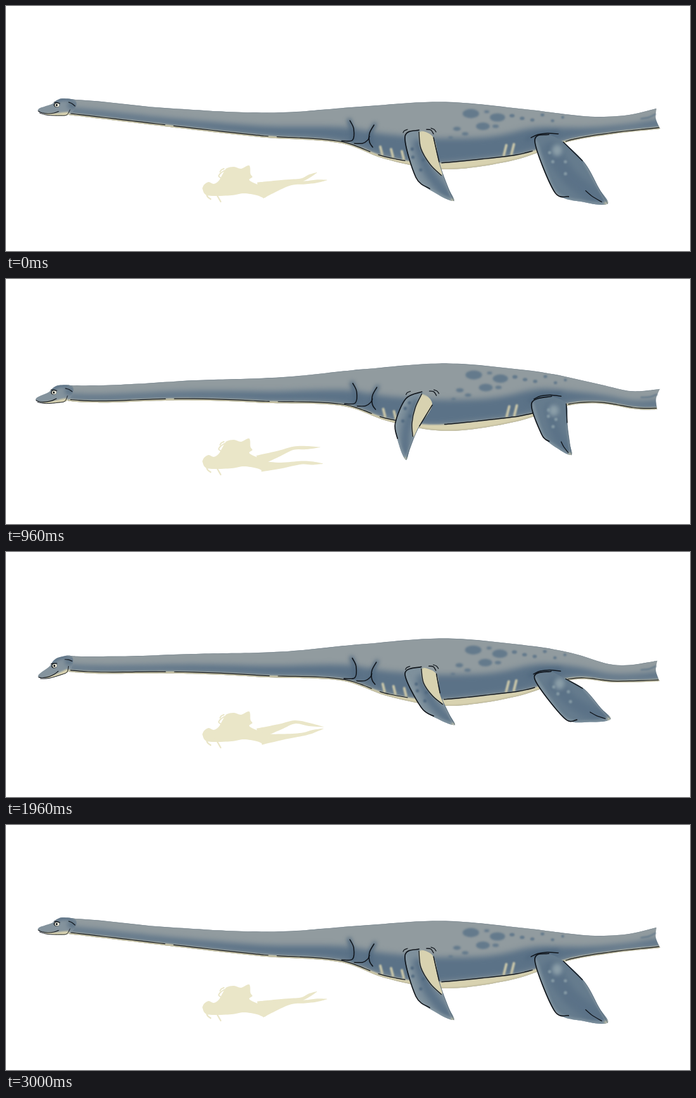
Animation of 1080 by 387 pixels, one loop 3040 ms. Source, as an HTML page with a canvas:

```html
<!DOCTYPE html>
<html lang="en">
<head>
<meta charset="utf-8">
<title>Swimming plesiosaur</title>
<style>
html, body { margin: 0; height: 100%; overflow: hidden; background: #fff; }
canvas { display: block; width: 1080px; height: 387px; }
</style>
</head>
<body>
<canvas id="stage" width="1080" height="387"></canvas>
<script>
const ctx = document.getElementById('stage').getContext('2d');
const LOOP = 3040, STEP = 40, CYCLE = 1500;
const LIGHT = '#919b9f', DARK = '#5b7287', CREAM = '#d8d2b0', INK = '#10151b', SAND = '#eae6c8';

// Key points of the resting silhouette
const BACK = [[98, 147], [150, 151], [250, 161], [420, 168.5], [560, 159], [690, 151.5], [820, 163],
  [920, 174.5], [980, 172.5], [1027, 162]];
const BELLY = [[98, 172], [400, 207], [530, 217], [600, 242], [690, 258], [800, 244], [890, 214],
  [960, 202], [1033, 194]];

// State of the swimming stroke, set once per frame
let theta, lift, drift, flick;

const mix = (a, b, u) => [a[0] + (b[0] - a[0]) * u, a[1] + (b[1] - a[1]) * u];
const bump = (x, mid, width) => Math.exp(-(((x - mid) / width) ** 2));
const ramp = (x, a, b) => Math.max(0, Math.min(1, (x - a) / (b - a)));
const wave = (mean, amount, lag) => mean + amount * Math.cos(theta - lag);
const pairs = flat => flat.reduce((out, v, i) => (i % 2 ? out : [...out, [v, flat[i + 1]]]), []);

// Smooth height at x through key points
function along(keys, x) {
  const last = keys.length - 1;
  const slope = i => {
    const a = keys[Math.max(0, i - 1)], b = keys[Math.min(last, i + 1)];
    return (b[1] - a[1]) / (b[0] - a[0]);
  };
  let n = 0;
  while (n < last - 1 && x > keys[n + 1][0]) n++;
  const [a, b] = [keys[n], keys[n + 1]], h = b[0] - a[0], u = (x - a[0]) / h, v = 1 - u;
  return a[1] * (1 + 2 * u) * v * v + b[1] * (1 + 2 * v) * u * u
    + h * u * v * (slope(n) * v - slope(n + 1) * u);
}

const back = x => along(BACK, Math.min(x, 1027));
const belly = x => along(BELLY, x);
const seam = x => belly(x) - 3 - 9 * bump(x, 730, 90);
const shade = x => back(x) + (belly(x) - back(x)) * (0.54 - 0.14 * bump(x, 840, 50));

// Bends a resting point with the stroke: head and tail against the trunk
function warp([x, y]) {
  const neck = 48 / (1 + (Math.max(0, x - 90) / 174) ** 2.2);
  const tail = 39 / (1 + Math.exp((948 - x) / 30));
  const slide = 5.3 * lift * ramp(x, 250, 500) * (1 - ramp(x, 870, 980));
  const shear = (179 - y) * 0.36 * flick * ramp(x, 985, 1027);
  return [x + slide + shear, y + (neck + tail - 24) * lift + 4 * drift * bump(x, 950, 36)];
}
const bent = flat => pairs(flat).map(warp);

function sample(height, from, to) {
  const n = Math.ceil(Math.abs(to - from) / 14);
  return Array.from({ length: n + 1 }, (_, i) => {
    const x = from + (to - from) * i / n;
    return warp([x, height(x)]);
  });
}

// Smooth curve through points, added to a path
function curve(path, pts, join) {
  if (join) path.lineTo(...pts[0]); else path.moveTo(...pts[0]);
  for (let i = 0; i < pts.length - 1; i++) {
    const p = pts[Math.max(0, i - 1)], a = pts[i], b = pts[i + 1], q = pts[Math.min(i + 2, pts.length - 1)];
    path.bezierCurveTo(a[0] + (b[0] - p[0]) / 6, a[1] + (b[1] - p[1]) / 6,
      b[0] - (q[0] - a[0]) / 6, b[1] - (q[1] - a[1]) / 6, b[0], b[1]);
  }
  return path;
}

function shape(...runs) {
  const path = new Path2D();
  runs.forEach((run, i) => curve(path, run, i > 0));
  path.closePath();
  return path;
}

function fill(path, color, blur = 0) {
  ctx.filter = blur ? `blur(${blur}px)` : 'none';
  ctx.fillStyle = color;
  ctx.fill(path);
  ctx.filter = 'none';
}

function line(pts, width = 1.4, color = INK, blur = 0) {
  ctx.filter = blur ? `blur(${blur}px)` : 'none';
  ctx.strokeStyle = color;
  ctx.lineWidth = width;
  ctx.stroke(curve(new Path2D(), pts));
  ctx.filter = 'none';
}

function oval([x, y], rx, ry, color, blur) {
  const path = new Path2D();
  path.ellipse(x, y, rx, ry, 0, 0, 7);
  fill(path, color, blur);
}

function inside(path, draw) {
  ctx.save();
  ctx.clip(path);
  draw();
  ctx.restore();
}

function drawSpots() {
  const color = '#647a8c';
  [[734, 170, 13], [776, 176, 12], [753, 190, 11], [773, 190, 5], [712, 194, 6], [725, 202, 5], [759, 167, 4],
    [702, 208, 3.5]].forEach(([x, y, r]) => oval(warp([x, y]), r, r * 0.55, color, 1.8));
  for (let i = 0; i < 6; i++) {
    oval(warp([799 + 16 * i, 177 + 5 * Math.cos(2.4 * i + 2.4)]), 4 - i / 3, 2.8 - i / 8, color, 1.2);
  }
}

function drawBody() {
  const top = sample(back, 98, 1027), under = sample(belly, 1033, 98);
  const whole = shape(top, bent([1027, 162, 1026, 178, 1033, 194]), under);
  const edge = sample(seam, 1033, 98);
  fill(whole, LIGHT);
  inside(whole, () => {
    fill(shape(sample(shade, 98, 1040), edge), DARK, 5);
    line(bent([542, 181, 546, 197, 548, 212]), 7, '#526a80', 3);
    line(bent([582, 187, 575, 203, 577, 216]), 6, '#526a80', 3);
    line(bent([822, 211, 838, 203, 870, 199]), 6, '#526a80', 3);
    drawSpots();
    for (const x of [594, 611, 628, 786, 798]) {
      line(sample(p => seam(x) - 2 - Math.abs(p - x) * 4, x, x + (x < 700 ? -3 : 4)), 4, '#c9c6a9', 1.3);
    }
    fill(shape(edge, sample(x => belly(x) + 6, 98, 1033)), CREAM, 1);
    line(under, 2, '#b5b095', 1);
    line(top, 1.2, '#7b8891', 0.5);
  });
  ctx.setLineDash([150, 14]);
  line(sample(x => seam(x) + 0.5, 102, 630), 1.2);
  ctx.setLineDash([]);
  line(sample(seam, 688, 831), 1.5);
  line(sample(x => belly(x) - 2, 884, 1031), 1.2);
  line(bent([1003, 178, 1015, 176, 1025, 171]), 2.5, '#667b8c', 1);
  line(bent([543, 181, 549, 194, 547, 212, 530, 213]), 1.6);
  line(bent([581, 188, 574, 201, 574, 215, 579, 223]), 1.6);
  line(bent([550, 217, 563, 217, 571, 212, 574, 206]), 1.5);
}

function drawHead(nod) {
  ctx.save();
  ctx.translate(100 - 5 * lift, 160 + 24 * lift);
  ctx.rotate(-nod / 45);
  ctx.translate(-100, -160);
  const skull = shape(pairs([50, 165, 54, 161, 72, 155, 80, 149, 90, 146, 109, 149,
    110, 160, 97, 172.5, 66, 172, 50, 165]));
  fill(skull, '#84939d');
  inside(skull, () => {
    line(pairs([80, 150, 90, 147, 103, 148]), 5, DARK, 2);
    oval([105, 157], 8, 7, '#627789', 3);
    fill(shape(pairs([54, 170, 82, 169, 99, 168, 98, 176, 54, 176])), CREAM, 1);
  });
  line(pairs([51, 166, 56, 168.5, 66, 170, 76, 169, 83, 166.5]), 1.2);
  line(pairs([53, 169, 66, 172.5, 86, 173, 96, 172, 101, 164]), 0.9);
  line(pairs([99, 152, 104, 154, 109, 158]), 1.2);
  oval([80, 156.3], 4.6, 3.7, INK);
  oval([80.6, 156.5], 3.7, 3, '#f2f0df');
  oval([80, 156.5], 1.5, 1.8, INK);
  line(pairs([76, 152, 80, 152.3, 85, 154]), 1.2);
  ctx.restore();
}

// A blade is one profile, swung about its root and scaled by its length
function drawFlipper({ root, angle, length, full, wide, color, front }) {
  const dx = Math.sin(angle), dy = Math.cos(angle), bend = 0.106;
  const at = (s, v) => [root[0] + length * (s * dx - v * dy), root[1] + length * (s * dy + v * dx)];
  const by = (x, y) => [root[0] + x, root[1] + y];
  const spread = (full - length) * 0.2;
  const twist = front ? 0.5 - angle : 0;
  const heel = by(-19 - spread, 2), nape = by(25 - 9 * twist, 3 + 12 * twist), crown = by(3, -9);
  const low = at(0.48, bend + wide), high = at(0.48, bend - wide), tip = at(1, 0);
  const lowEnd = at(0.8, 0.65 * bend + wide / 2), highEnd = at(0.8, 0.65 * bend - wide / 2);
  const lower = [crown, heel, low, lowEnd, tip], upper = [tip, highEnd, high, nape, crown];
  const blade = shape([...lower, ...upper.slice(1)]);

  fill(blade, color);
  inside(blade, () => {
    line([at(0.1, 0.05), at(0.5, bend), at(0.9, 0.04)], length * wide * 0.8, DARK, 5);
    line(lower.slice(1), 4, '#8799a3', 2);
    line(upper.slice(0, 3), 3, '#83939d', 1.5);
    oval(tip, 5, 3, CREAM, 2);
    if (front) {
      const inner = [by(2, -6), at(0.17, 0.045), at(0.42, 0.04), at(0.62, -0.02)];
      fill(shape(inner, [at(0.6, -0.3), at(0, -0.4)]), CREAM, 1.2);
      line(inner, 1.3);
    } else {
      oval(at(0.16, 0), 8, 9, '#8b9ea8', 3);
    }
    for (let i = 0; i < 4; i++) {
      oval(at(0.12 + 0.1 * i, (front ? 0.15 : 0.08) + 0.06 * Math.sin(i * 2.3)), 2.6, 2.6,
        front ? '#526a80' : '#8499a4', 1);
    }
  });
  line(upper.slice(0, 4), 0.8, '#4b6072');
  line([crown, heel, low, mix(low, lowEnd, front ? 0.7 : 0.5)].map(([x, y]) => [x - 1, y]), 1.7);
  line([nape, mix(nape, high, 0.5), mix(nape, high, 0.9)], 1.4);
  if (!front) line([at(0.72, 0.08), at(0.82, 0.07), at(0.94, 0.035)], 1.3);
}

function drawFlippers() {
  drawFlipper({ root: warp([650, 205]), angle: wave(0.262, 0.5, 1.06), length: wave(106, 12, -0.26),
    full: 118, wide: 0.178, color: '#7f919d', front: true });
  line(bent([627, 200, 629, 197, 634, 195]), 1.2);
  line(bent([664, 195, 671, 196, 675, 202]), 1.4);
  line(bent([671, 193, 676, 195, 679, 199]), 1.2);
  drawFlipper({ root: warp([855, 212]), angle: wave(0.68, 0.34, 1.34), length: wave(114, 26.6, 0.447),
    full: 138, wide: 0.235, color: '#667c8e' });
  line(bent([829, 208, 840, 203, 855, 201, 872, 202]), 1.5);
}

function drawLeg(...joints) {
  const [ankle, tip] = joints.slice(2);
  joints.splice(3, 0, mix(ankle, tip, 0.5));
  const widths = [8.5, 4.6, 2.6, 2.6, 0.3];
  const side = s => joints.map((p, i) => {
    const a = joints[Math.max(0, i - 1)], b = joints[Math.min(4, i + 1)];
    const d = Math.hypot(b[0] - a[0], b[1] - a[1]) / widths[i] * s;
    return [p[0] - (b[1] - a[1]) / d, p[1] + (b[0] - a[0]) / d];
  });
  fill(shape(side(1), side(-1).reverse()), SAND);
}

function drawDiver() {
  drawLeg([398, 287], [440 - 10 * lift, 279 - 4 * lift], [466 - 14 * lift, 275 - 9 * lift],
    [wave(496, 6.4, 2.47), wave(268, 8.6, 2.19)]);
  drawLeg([403, 296], [445 - 12 * lift, 280 + 17 * lift], [472 - 7 * lift, 279 + 13 * lift],
    [507 - 8 * lift, 275 + 19 * flick]);
  fill(shape(pairs([310, 288, 313, 282, 320, 278, 328, 281, 336, 276, 344, 262, 349, 256, 360, 254,
    371, 257, 384, 252, 386, 265, 389, 270, 385, 276, 410, 288, 414, 296,
    408, 303, 396, 299, 376, 296, 356, 299, 325, 300, 314, 297, 310, 288])), SAND);
  line(pairs([345, 260, 339, 264, 336, 269, 342, 273]), 2, SAND);
  line(pairs([344, 257, 340, 259, 338, 262]), 2, SAND);
  line(pairs([331, 295, 335, 302, 339, 309]), 2.2, SAND);
  line(pairs([316, 293, 318, 301, 323, 305]), 2.4, SAND);
}

function render(now) {
  const time = Math.floor(now % LOOP / STEP) * STEP;
  theta = time % CYCLE / CYCLE * Math.PI * 2;
  lift = (1 - Math.cos(theta)) / 1.9;
  drift = Math.sin(theta);
  flick = (Math.cos(0.7) - Math.cos(theta - 0.7)) / 2;
  // The head dips further on the second stroke
  const nod = (time > CYCLE ? 14 : 9.5) * lift + 4.5 * drift;
  ctx.fillStyle = '#fff';
  ctx.fillRect(0, 0, 1080, 387);
  ctx.lineCap = ctx.lineJoin = 'round';
  drawDiver();
  drawBody();
  drawHead(nod);
  drawFlippers();
}

let start;
function tick(now) {
  start ??= now;
  render(now - start);
  requestAnimationFrame(tick);
}
render(0);
requestAnimationFrame(tick);
</script>
</body>
</html>
```
